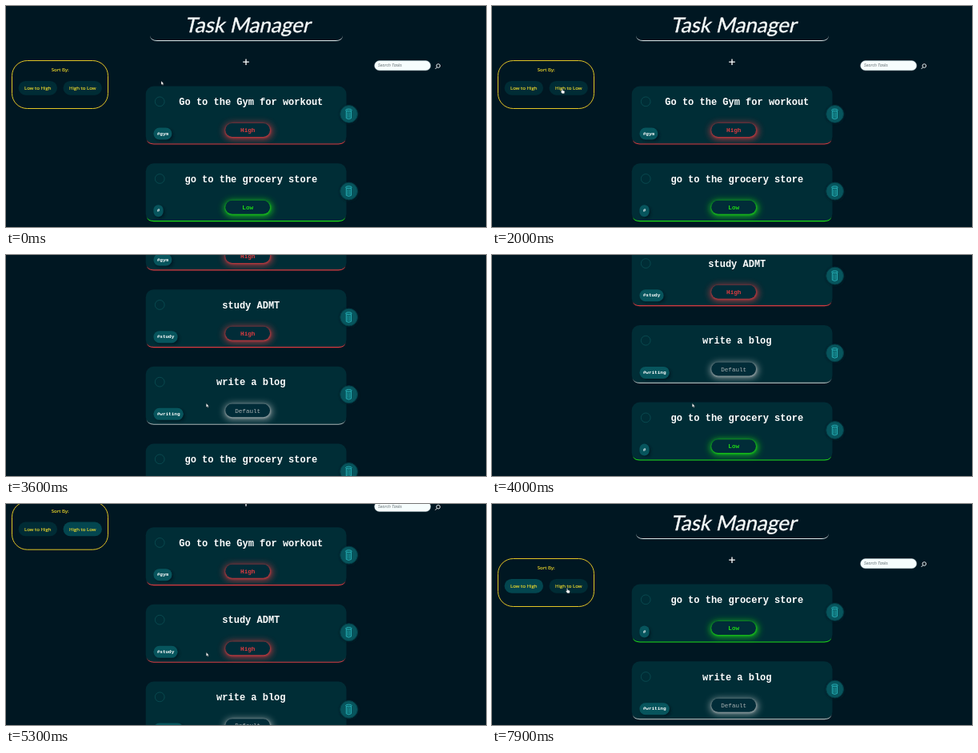
An HTML page that plays this animation: 600x277 px, repeating every 8000 ms.

```html
<!DOCTYPE html>
<html lang="en">
<head>
<meta charset="utf-8">
<title>Task Manager</title>
<style>
  html, body { margin: 0; width: 100%; height: 100%; overflow: hidden; background: #001722; }
  svg { display: block; width: 100vw; height: 100vh; }
  text { text-anchor: middle; }
  .sans { font-family: "Open Sans", "Noto Sans", sans-serif; }
  .mono { font-family: "Liberation Mono", "Courier New", monospace; font-weight: bold; }
  .heading { font: 26px Lato, sans-serif; fill: #f4f8f8; stroke: #f4f8f8; stroke-width: .4; }
  .name { font-size: 12px; fill: #fff; }
  .tag { font-size: 6px; fill: #fff; }
  .level { font-size: 7.6px; }
  .plain { font-weight: normal; }
  .sort { font-size: 6.1px; fill: #f8e02c; stroke: #f8e02c; stroke-width: .12; }
  .hint { font-size: 5.4px; font-style: italic; fill: #5d686d; text-anchor: start; }
</style>
</head>
<body>
<svg id="stage" viewBox="0 0 600 277">
  <defs>
    <filter id="halo" x="-50%" y="-120%" width="200%" height="340%"><feGaussianBlur stdDeviation="4"/></filter>
    <filter id="rim" x="-20%" y="-50%" width="140%" height="200%"><feGaussianBlur stdDeviation="1.2"/></filter>
    <filter id="soft" x="-50%" y="-50%" width="200%" height="200%"><feGaussianBlur stdDeviation="1.6"/></filter>
  </defs>
  <g id="page">
    <text class="heading" transform="translate(301.5 33.3) skewX(-13)">Task Manager</text>
    <path d="M180 37Q181 43 189 43H412Q420 43 421 37Q420.5 44 412 44H189Q180.5 44 180 37Z" fill="#dfe7e8"/>
    <path d="M296.2 70.2h7.6M300 66.4v7.6" stroke="#fff" stroke-width="1.3"/>
    <rect x="7.5" y="68.5" width="120" height="60" rx="19" fill="none" stroke="#e3c526"/>
    <text class="sans sort" x="67.7" y="82">Sort By:</text>
    <g id="buttons"></g>
    <rect x="460.6" y="68.6" width="70.2" height="12.2" rx="6.1" fill="#f6fdfd" stroke="#a9c0c4" stroke-width=".4"/>
    <text class="sans hint" x="465" y="76.4">Search Tasks</text>
    <g fill="none" stroke="#fff" stroke-width=".9">
      <circle cx="540.3" cy="75" r="2.3"/><path d="M538.6 76.8L536.6 79"/>
    </g>
    <g id="cards"></g>
  </g>
  <g id="cursor">
    <path id="arrow" d="M0 0V4.6L1.1 3.7L1.9 5.3L2.7 4.9L1.9 3.4H3.3Z" fill="#fff" stroke="#333" stroke-width=".3"/>
    <path id="hand" d="M0 .4Q.6 -.3 1.1 .4V2.3L3.4 2.9Q4 3.2 3.8 4.2L3.3 6.2H.6L-1 3.9Q-1.1 3.1 -.4 3.2L0 3.6Z" fill="#fff" stroke="#333" stroke-width=".3"/>
  </g>
</svg>
<script>
const LOOP = 8000, CARD_TOP = 100.5, CARD_STEP = 96.7, MAX_SCROLL = 206;
const SORT_HIGH = 2400, SORT_LOW = 7000;
const $ = id => document.getElementById(id);

const colors = { High: '#dc3b40', Low: '#1fdc16', Default: '#a9b1b2' };
const tasks = {
  gym: ['Go to the Gym for workout', '#gym', 'High'],
  grocery: ['go to the grocery store', '#', 'Low'],
  study: ['study ADMT', '#study', 'High'],
  blog: ['write a blog', '#writing', 'Default'],
};
const orders = {
  none: ['gym', 'grocery', 'study', 'blog'],
  high: ['gym', 'study', 'blog', 'grocery'],
  low: ['grocery', 'blog', 'gym', 'study'],
};

// time, x, y: the pointer rests on equal neighbours
const pointer = [
  [0, 194, 94], [700, 194, 94], [1600, 87, 103.5], [2500, 87, 103.5],
  [3100, 250.3, 186], [5500, 250.3, 186], [6000, 239.3, 181], [6200, 239.3, 181],
  [6800, 43, 104], [7200, 43, 104], [7700, 93.5, 105.5], [8000, 93.5, 105.5],
];

const pill = (x, y, w, h, attrs) =>
  `<rect x="${x}" y="${y}" width="${w}" height="${h}" rx="${Math.min(w, h) / 2}" ${attrs}/>`;

function cardMarkup([name, tag, level]) {
  const color = colors[level], tagWidth = tag.length * 3.6 + 8.6;
  const weight = level === 'Default' ? 'plain' : '';
  return `
    <rect x="174.7" width="250.8" height="72.8" rx="10" fill="#002d36"/>
    <path d="M175.5 66.5Q177.5 71.9 184.7 71.9H415.5Q422.7 71.9 424.7 66.5Q423 73 415.5 73H184.7Q177.2 73 175.5 66.5Z" fill="${color}"/>
    <circle cx="192.2" cy="19.3" r="5.9" fill="none" stroke="#0b4c52" stroke-width=".9"/>
    <text class="mono name" x="306.3" y="23.5">${name}</text>
    ${pill(186.5, 54, tagWidth, 15, 'fill="#001820" opacity=".8" filter="url(#soft)"')}
    ${pill(184.4, 52, tagWidth, 15, 'fill="#07555d"')}
    <text class="mono tag" x="${184.4 + tagWidth / 2}" y="61.2">${tag}</text>
    ${pill(272.5, 46.5, 60.5, 20, `fill="${color}" opacity=".75" filter="url(#halo)"`)}
    ${pill(274, 47, 56.8, 17.6, `fill="${color}" opacity=".8" filter="url(#rim)"`)}
    ${pill(274.2, 46.6, 55.8, 16.9, 'fill="#012c38"')}
    <text class="mono level ${weight}" x="302.2" y="57.7" fill="${color}">${level}</text>
    <circle cx="429" cy="35.5" r="11.6" fill="#001d26" filter="url(#soft)"/>
    <circle cx="428.6" cy="34.9" r="10.9" fill="#07555d" stroke="#043b44"/>
    <g fill="#0a666d" stroke="#2cbcc3" stroke-width=".8">
      <path d="M425.3 30V40.2Q428.4 42.4 431.5 40.2V30Z"/>
      <ellipse cx="428.4" cy="30" rx="3.8" ry="1.4"/>
      <path d="M427.2 33V39.5M429.6 33V39.5" stroke-width=".5"/>
    </g>`;
}

const cards = {};
for (const key in tasks) {
  $('cards').insertAdjacentHTML('beforeend', `<g>${cardMarkup(tasks[key])}</g>`);
  cards[key] = $('cards').lastElementChild;
}
const buttons = {};
[['low', 'Low to High', 15.6], ['high', 'High to Low', 71.5]].forEach(([key, label, x]) => {
  $('buttons').insertAdjacentHTML('beforeend',
    `<g>${pill(x, 93.9, 48.4, 17.8, '')}<text class="sans sort" x="${x + 24.2}" y="104.9">${label}</text></g>`);
  buttons[key] = $('buttons').lastElementChild.firstElementChild;
});

function ease(t, from, to) {
  const u = Math.min(1, Math.max(0, (t - from) / (to - from)));
  return u * u * (3 - 2 * u);
}

function pointerAt(t) {
  const i = pointer.findIndex(p => p[0] > t);
  const [t0, x0, y0] = pointer[i - 1], [t1, x1, y1] = pointer[i];
  const u = ease(t, t0, t1);
  return [x0 + (x1 - x0) * u, y0 + (y1 - y0) * u];
}

function draw(t) {
  const sort = t < SORT_HIGH ? 'none' : t < SORT_LOW ? 'high' : 'low';
  const scroll = MAX_SCROLL * (ease(t, 3265, 3765) - ease(t, 5150, 5400));
  $('page').setAttribute('transform', `translate(0 ${-scroll})`);
  orders[sort].forEach((key, i) =>
    cards[key].setAttribute('transform', `translate(0 ${CARD_TOP + i * CARD_STEP})`));
  for (const key in buttons) buttons[key].setAttribute('fill', key === sort ? '#03464f' : '#002c35');

  const [x, y] = pointerAt(t);
  const overButton = y > 94 && y < 112 && (x > 15 && x < 64 || x > 71 && x < 120);
  $('cursor').setAttribute('transform', `translate(${x} ${y})`);
  $('hand').style.display = overButton ? '' : 'none';
  $('arrow').style.display = overButton ? 'none' : '';
}

function tick() {
  draw(performance.now() % LOOP);
  requestAnimationFrame(tick);
}
tick();
</script>
</body>
</html>
```
